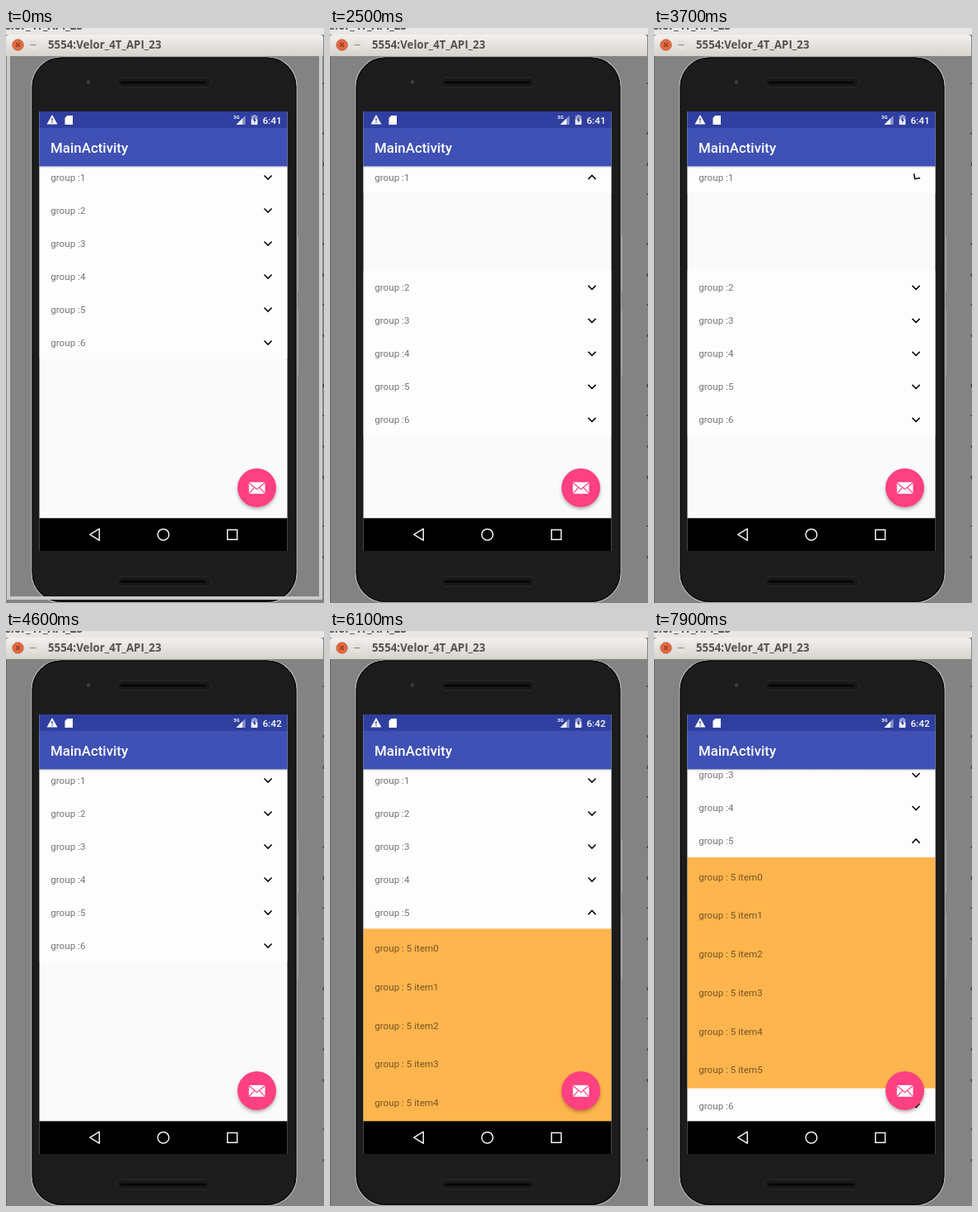
An HTML page that plays this animation: 386x696 px, repeating every 8000 ms.

```html
<!DOCTYPE html>
<html lang="en">
<head>
<meta charset="utf-8">
<title>Expandable list</title>
<style>
  html, body { margin: 0; width: 100%; height: 100%; overflow: hidden; background: #838383; }
  svg { display: block; width: 386px; height: 696px; }
  text { font-family: Roboto, "Noto Sans", sans-serif; white-space: pre; }
  .title { font: bold 13.3px "Open Sans", "Noto Sans", sans-serif; fill: #55534e; }
  .label { font-size: 11.67px; fill: #000; fill-opacity: .54; }
  .chevron { fill: none; stroke: #080808; stroke-width: 1.6; }
  .nav { fill: none; stroke: #f4f4f4; stroke-width: 1.5; }
</style>
</head>
<body>
<svg viewBox="0 0 386 696" xmlns="http://www.w3.org/2000/svg">
  <defs>
    <linearGradient id="bar" x2="0" y2="1">
      <stop stop-color="#f3f1ee"/><stop offset="1" stop-color="#d6d3ce"/>
    </linearGradient>
    <linearGradient id="drop" x2="0" y2="1">
      <stop stop-color="#000" stop-opacity=".18"/><stop offset="1" stop-color="#000" stop-opacity="0"/>
    </linearGradient>
    <filter id="blur" x="-30%" y="-30%" width="160%" height="160%"><feGaussianBlur stdDeviation="2.2"/></filter>
    <clipPath id="listClip"><rect x="40.5" y="167" width="301" height="427"/></clipPath>
    <g id="speaker">
      <rect x="133.5" y="-6" width="115" height="12" rx="6" fill="#191919" stroke="#2c2c2c"/>
      <rect x="139" y="-1.5" width="104" height="3" rx="1.5" fill="#070707"/>
    </g>
  </defs>

  <rect width="386" height="696" fill="#838383"/>
  <path id="darkFrame" d="M.5 34V696" stroke="#656565"/>
  <g id="ticks" fill="#444"></g>

  <rect width="386" height="8" fill="#e8e7e5"/>
  <text class="title" x="-2" y="1.5">elor_4T_API_23</text>
  <path d="M0 34V12Q0 8 4 8H381Q385 8 385 12V34Z" fill="url(#bar)"/>
  <circle cx="14.5" cy="20.5" r="6.8" fill="#e5683f" stroke="#b9664b" stroke-width=".8"/>
  <path d="M12 18l5 5m0-5l-5 5" stroke="#8b3c25" stroke-width="1.3"/>
  <circle cx="33" cy="20.5" r="6.5" fill="#e5e2dd"/>
  <path d="M29.5 20.5h7" stroke="#8f8c86" stroke-width="1.2"/>
  <text class="title" x="51" y="25">5554:Velor_4T_API_23</text>

  <path d="M354.5 252v66m0 24v78" stroke="#a2a2a2"/>
  <rect x="31" y="35" width="322" height="660.5" rx="36" fill="#1c1c1c" stroke="#b8b8b8" stroke-width="1.2"/>
  <rect x="32.3" y="36.3" width="319.4" height="657.9" rx="34.7" fill="none" stroke="#0c0c0c" stroke-width="1.4"/>
  <circle cx="100" cy="65.5" r="2.2" fill="#3c4046"/>
  <use href="#speaker" y="66"/>
  <use href="#speaker" y="670"/>
  <path id="paleFrame" d="M3 34V690H382V34" fill="none" stroke="#cbcbcb" stroke-width="4"/>

  <rect x="40.5" y="101" width="301" height="532" fill="#fafafa"/>
  <g id="list" clip-path="url(#listClip)"></g>
  <rect x="40.5" y="167" width="301" height="3" fill="url(#drop)"/>
  <rect x="40.5" y="101" width="301" height="20.5" fill="#303f9f"/>
  <rect x="40.5" y="121" width="301" height="46.4" fill="#3f51b5"/>
  <text x="54" y="150.8" font-size="16.9" font-weight="500" fill="#fff">MainActivity</text>

  <path d="M56 105L62.5 116.5H49.5Z" fill="#fff"/>
  <path d="M56 109v3.5m0 1v1.6" stroke="#303f9f" stroke-width="1.3"/>
  <path d="M74.3 106H81V117H71.5V109Z" fill="#fff"/>
  <text x="276" y="110" font-size="6" font-weight="700" fill="#fff">3G</text>
  <path d="M290.5 106V117H279.5Z" fill="#8c95cc"/>
  <path d="M287 109.5V117H279.5Z" fill="#fff"/>
  <path d="M300 105h3v1.3h2.2V117h-7.4V106.3H300Z" fill="#98a0d2"/>
  <path d="M297.8 110.5h7.4V117h-7.4Z" fill="#fff"/>
  <path d="M302.2 107.5l-2.6 4.5h1.7v3.3l2.4-4.4h-1.5Z" fill="#303f9f"/>
  <text id="clock" x="311.4" y="115.6" font-size="11.8" font-weight="500" fill="#fff"></text>

  <circle cx="304.5" cy="559" r="23.3" opacity=".3" filter="url(#blur)"/>
  <circle cx="304.5" cy="556.5" r="23.5" fill="#ff4081"/>
  <rect x="294.8" y="549.8" width="19.6" height="14" rx="1" fill="#fff"/>
  <path d="M295 550.5L304.6 558.5L314.2 550.5M295 563.3L301.5 556.3M314.2 563.3L307.7 556.3"
        fill="none" stroke="#ff4081" stroke-width="1.2"/>

  <rect x="40.5" y="593.3" width="301" height="39.7" fill="#000"/>
  <path class="nav" d="M113.3 606.2V620.2L101.8 613.2Z" stroke-linejoin="round"/>
  <circle class="nav" cx="191" cy="613.2" r="6.8"/>
  <rect class="nav" x="268.8" y="607.4" width="11.8" height="11.8"/>
  <circle id="touch" r="8.5" fill="#fff" fill-opacity=".75" stroke="#dcdce0" stroke-width="2"/>
</svg>
<script>
const LOOP = 8000, STEP = 100;
const LIST_TOP = 160.2, ROW = 40, ITEM = 46.67, GROUPS = 6, SCROLL_MAX = 86.5;
const byId = id => document.getElementById(id);
const list = byId('list');

const clamp = x => Math.min(1, Math.max(0, x));
const ramp = (t, from, to) => clamp((t - from) / (to - from));
const ease = x => (1 - Math.cos(Math.PI * x)) / 2;
const mix = (a, b, k) => a + (b - a) * k;
const place = (node, x, y) => node.setAttribute('transform', `translate(${x} ${y})`);
const show = (node, on) => node.setAttribute('visibility', on ? 'visible' : 'hidden');

function add(parent, tag, attrs = {}, text = '') {
  const node = document.createElementNS('http://www.w3.org/2000/svg', tag);
  for (const key in attrs) node.setAttribute(key, attrs[key]);
  node.textContent = text;
  parent.append(node);
  return node;
}

const addPanel = (parent, height, fill) => add(parent, 'rect', { x: 40.5, width: 301, height, fill });
const addLabel = (parent, middle, text) => add(parent, 'text', { class: 'label', x: 54.2, y: middle + 4.8 }, text);

function addItems(group, count) {
  const items = add(list, 'g');
  addPanel(items, count * ITEM, '#ffb54d');
  for (let i = 0; i < count; i++) addLabel(items, (i + .5) * ITEM, `group : ${group} item${i}`);
  return items;
}

const sections = [
  { group: 1, count: 2, items: addItems(1, 2) },
  { group: 5, count: 6, items: addItems(5, 6) }
];
const rows = Array.from({ length: GROUPS }, (_, i) => {
  const node = add(list, 'g');
  addPanel(node, ROW, '#fdfdfd');
  addLabel(node, ROW / 2, `group :${i + 1}`);
  const chevron = add(node, 'path', { class: 'chevron', d: 'M-4.6 -2.3L0 2.3L4.6 -2.3' });
  return { node, chevron };
});

for (let i = 0; i < 14; i++) {
  add(byId('ticks'), 'rect', { x: 384.6, y: 66 + i * 43 + (i * 17) % 23, width: 1.4, height: 2 + i % 3 });
}

// Opening amount, item opacity and chevron angle of each section
function sectionState(group, t) {
  if (group === 1) return {
    open: ease(ramp(t, 2220, 2480)) - ease(ramp(t, 3710, 3960)),
    alpha: ramp(t, 2510, 2640) * (1 - ramp(t, 3600, 3690)),
    angle: 180 * (ease(ramp(t, 2190, 2450)) - ramp(t, 3600, 3724))
  };
  return {
    open: ease(ramp(t, 5620, 5880)),
    alpha: ramp(t, 5897, 6020),
    angle: 180 * ease(ramp(t, 5590, 5850))
  };
}

function touchAt(t) {
  if (t >= 2000 && t < 2200) return [272, 184];
  if (t >= 3500 && t < 3700) return [272, 184];
  if (t >= 5400 && t < 5600) return [204, 341];
  if (t >= 6900 && t < 7400) return [198, mix(365, 267, ramp(t, 6900, 7200))];
  return null;
}

function draw(t) {
  const scroll = SCROLL_MAX * ramp(t, 6900, 7180);
  const tops = rows.map((_, i) => LIST_TOP + i * ROW - scroll);
  const angles = rows.map(() => 0);

  for (const { group, count, items } of sections) {
    const { open, alpha, angle } = sectionState(group, t);
    place(items, 0, tops[group - 1] + ROW);
    items.setAttribute('opacity', alpha);
    angles[group - 1] = angle;
    for (let i = group; i < GROUPS; i++) tops[i] += open * count * ITEM;
  }
  rows.forEach(({ node, chevron }, i) => {
    place(node, 0, tops[i]);
    chevron.setAttribute('transform', `translate(318 20.6) rotate(${angles[i]})`);
  });

  const touch = touchAt(t);
  show(byId('touch'), touch);
  if (touch) place(byId('touch'), ...touch);
  byId('clock').textContent = t < 4500 ? '6:41' : '6:42';
  show(byId('paleFrame'), t < 300);
  show(byId('darkFrame'), t >= 300);
}

function tick() {
  const t = performance.now() % LOOP;
  draw(Math.floor(t / STEP) * STEP);
  requestAnimationFrame(tick);
}
tick();
</script>
</body>
</html>
```
